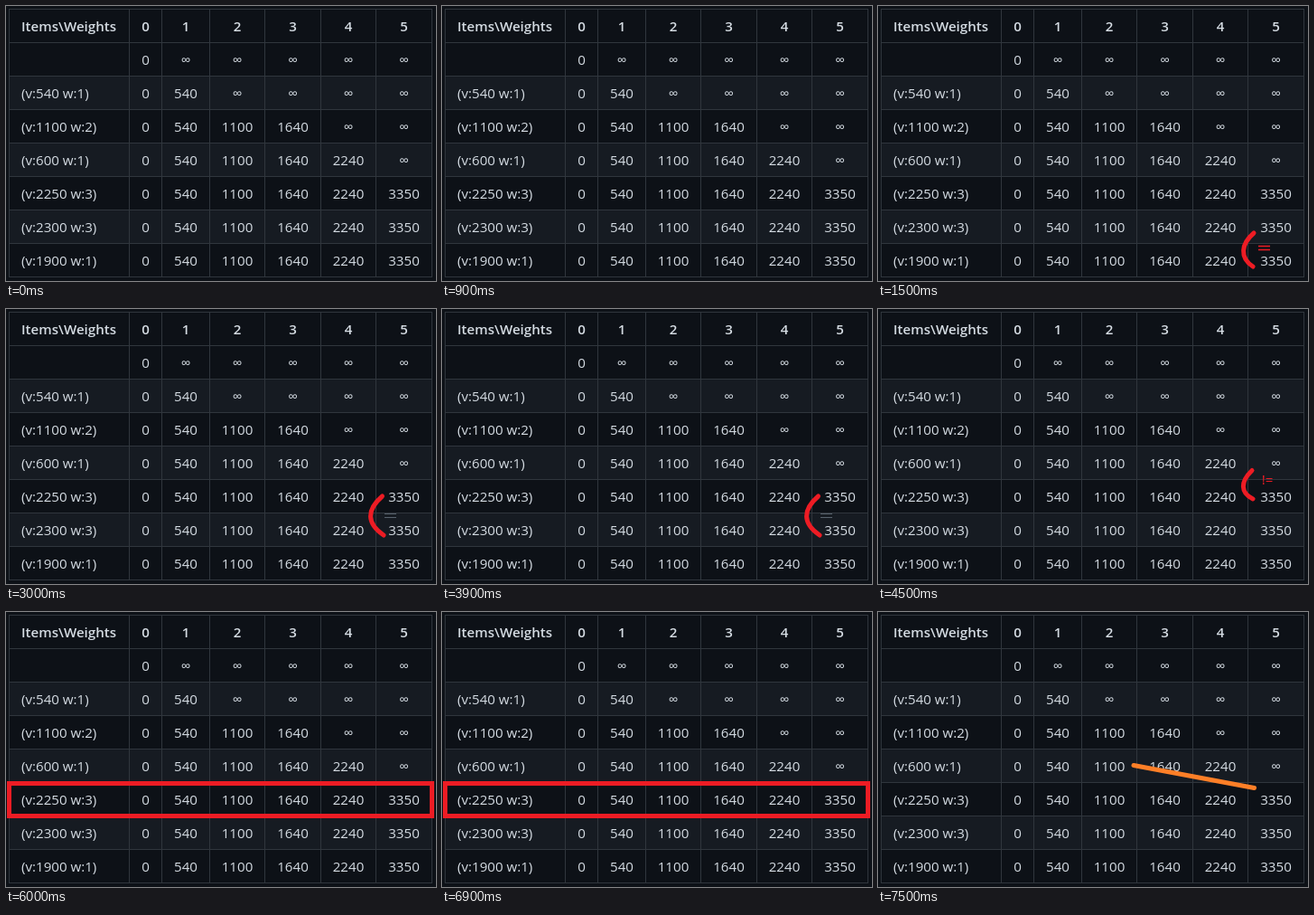
These frames come from a looping animation (476 by 304 pixels, 8000 ms). An HTML page:

```html
<!DOCTYPE html>
<html lang="en">
<head>
<meta charset="utf-8">
<title>Knapsack table</title>
<style>
  html, body { margin: 0; width: 100%; height: 100%; overflow: hidden; background: #0d1117; }
  svg { display: block; width: 476px; height: 304px; }
  text { font: 15.1px "Open Sans", "Noto Sans", sans-serif; fill: #d5dce3; text-anchor: middle; }
  .head { font-weight: 600; }
  .label { text-anchor: start; }
  .grid { fill: #30363d; }
  .stripe { fill: #161b22; }
  .mark { fill: none; stroke: #ed1c24; stroke-width: 5; stroke-linecap: round; }
  .thin { fill: none; stroke: #ed1c24; stroke-width: 1.3; }
  .faint { stroke: #59636e; stroke-width: 1; }
  .red { fill: #ed1c24; }
  .route { stroke: #ff7f27; }
</style>
</head>
<body>
<svg viewBox="0 0 476 304">
  <g id="table"></g>
  <g class="step"></g>
  <g class="step">
    <path class="mark" d="M416 251C402 263 400 278 415 288"/>
    <path class="thin" d="M421 265.5h13M421 269.5h13"/>
  </g>
  <g class="step">
    <path class="mark" d="M416.5 207C399 222 399 237 418 250"/>
    <path class="thin faint" d="M419 226.5h13M419 230.5h13"/>
  </g>
  <g class="step">
    <path class="mark" d="M414 178.5C401 191 401 203 415 210"/>
    <text class="red" x="431" y="194">!=</text>
  </g>
  <g class="step">
    <rect class="mark" x="3.5" y="189.5" width="468" height="36"/>
  </g>
  <g class="step">
    <path class="mark route" d="M283 169.5L416.5 194.5"/>
  </g>
</svg>
<script>
const columns = [3, 136, 172, 225, 286, 348, 409, 471];
const top0 = 3, rowHeight = 37;
const rows = [
  "Items\\Weights|0|1|2|3|4|5",
  "|0|∞|∞|∞|∞|∞",
  "(v:540 w:1)|0|540|∞|∞|∞|∞",
  "(v:1100 w:2)|0|540|1100|1640|∞|∞",
  "(v:600 w:1)|0|540|1100|1640|2240|∞",
  "(v:2250 w:3)|0|540|1100|1640|2240|3350",
  "(v:2300 w:3)|0|540|1100|1640|2240|3350",
  "(v:1900 w:1)|0|540|1100|1640|2240|3350",
].map(row => row.split("|"));

const rect = (kind, x, y, w, h) =>
  `<rect class="${kind}" x="${x}" y="${y}" width="${w}" height="${h}"/>`;

const rowTop = r => top0 + r * rowHeight;
let stripes = "", lines = "", texts = "";

rows.forEach((cells, r) => {
  if (r && r % 2 === 0) stripes += rect("stripe", 3, rowTop(r), 469, rowHeight);
  cells.forEach((value, c) => {
    const x = c ? (columns[c] + columns[c + 1] + 1) / 2 : 17;
    const kind = (r ? "" : "head ") + (c ? "" : "label");
    texts += `<text class="${kind}" x="${x}" y="${rowTop(r) + 25}">${value}</text>`;
  });
});
for (let r = 0; r <= rows.length; r++) lines += rect("grid", 3, rowTop(r), 469, 1);
for (const x of columns) lines += rect("grid", x, top0, 1, rows.length * rowHeight + 1);
document.getElementById("table").innerHTML = stripes + lines + texts;

const steps = document.querySelectorAll(".step");
const stepTime = 1500, loopTime = 8000;

function draw() {
  const current = Math.floor(performance.now() % loopTime / stepTime);
  steps.forEach((step, i) => step.style.display = i === current ? "" : "none");
  requestAnimationFrame(draw);
}
draw();
</script>
</body>
</html>
```
